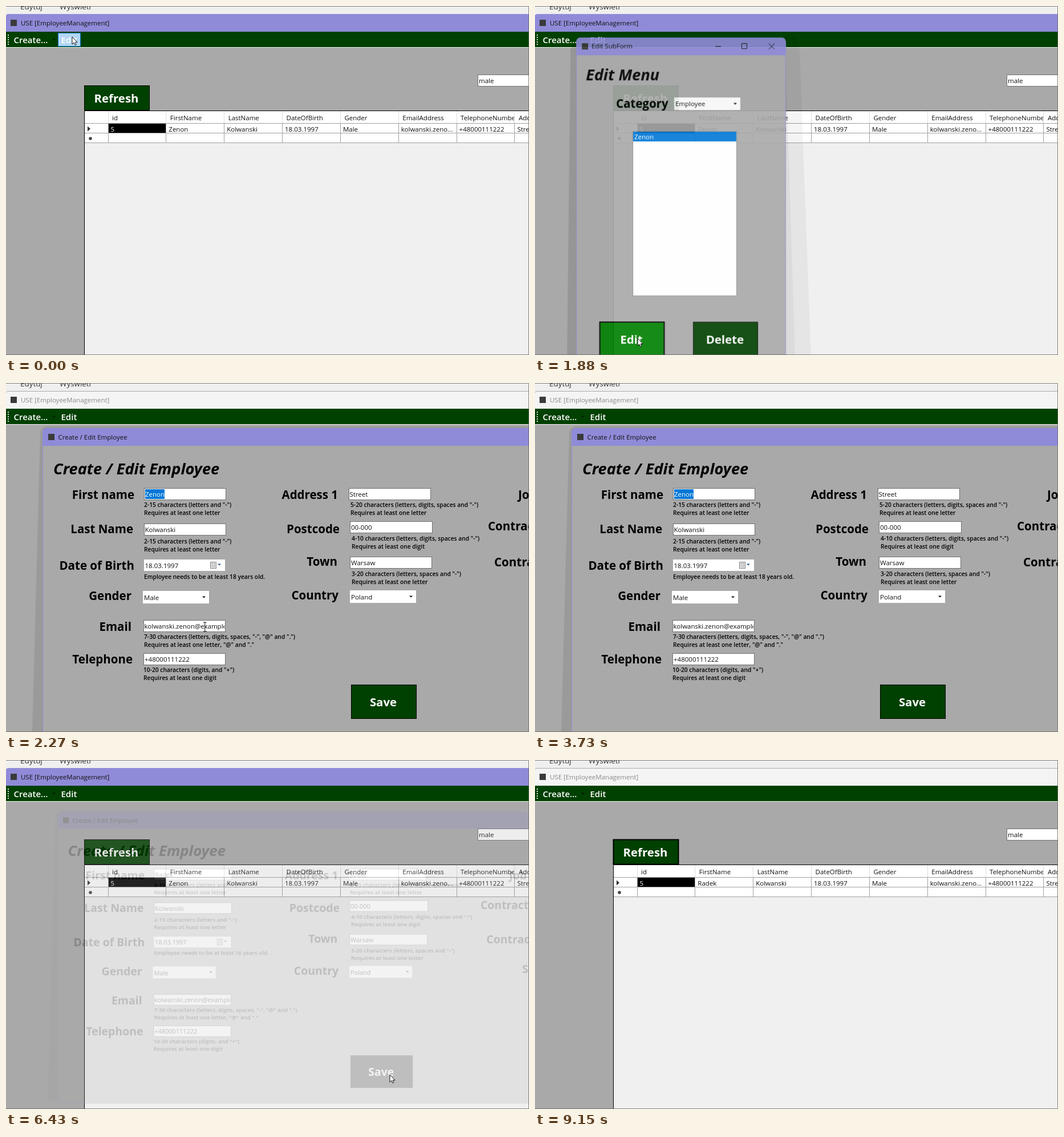
An HTML page for the animation above (9190 ms loop, 917 px wide and 611 px high).

```html
<!DOCTYPE html>
<html>
<head>
<meta charset="utf-8">
<style>
  html, body { margin: 0; width: 100%; height: 100%; overflow: hidden; background: #a9a9a9; }
  svg { display: block; width: 100vw; height: 100vh; }
  text { font: 11.5px "Open Sans", "Noto Sans", sans-serif; fill: #111; white-space: pre; }
  .label { font-size: 20.5px; font-weight: 700; fill: #000; }
  .end { text-anchor: end; }
  .head { font-size: 27.2px; font-weight: 700; font-style: italic; fill: #000; }
  .hint { font-size: 10.25px; font-weight: 600; fill: #000; }
  .btn { font-size: 20.4px; font-weight: 700; fill: #fff; text-anchor: middle; }
  .menu { font-size: 15px; font-weight: 600; fill: #fff; }
  .top { font-size: 13.4px; fill: #333; }
  .white { fill: #fff; }
</style>
</head>
<body>
<svg id="stage" viewBox="0 0 917 611"></svg>
<script>
const LOOP = 9190;
const OLD = 'Zenon', NEW = 'Radek', LAST = 'Kolwanski', PHONE = '+48000111222', BORN = '18.03.1997';
const PURPLE = '#8f8bd8', DARK = '#004000', HOVER = '#008000', PRESS = '#000', BLUE = '#0078d7';

const text = (s, x, y, cls = '', extra = '') => `<text x="${x}" y="${y}" class="${cls}" ${extra}>${s}</text>`;
const rect = (x, y, w, h, fill, extra = '') =>
  `<rect x="${x}" y="${y}" width="${w}" height="${h}" fill="${fill}" ${extra}/>`;
const path = (d, fill, extra = '') => `<path d="${d}" fill="${fill}" ${extra}/>`;
const group = (id, ...parts) => `<g id="${id}">${parts.join('')}</g>`;
const box = (x, y, w, h) => rect(x + .5, y + .5, w, h - 1, '#fff', 'stroke="#707070"');
const arrow = (x, y, fill = '#111') => path(`M${x - 3},${y - 1.5}h6l-3,3z`, fill);
const combo = (x, y) => rect(x, y, 116, 22, '#fff') + arrow(x + 107, y + 11);
const icon = (x, y) => rect(x, y, 11, 11, '#3a3a3a');
const button = (id, s, x, y, w, h) =>
  rect(x + .5, y + .5, w - 1, h - 1, DARK, `id="${id}" stroke="#000"`) + text(s, x + w / 2 - 1, y + h / 2 + 8, 'btn');
const frame = (x, y, w, h) =>
  rect(x + .5, y + .5, w - 1, h, '#a9a9a9', `rx="8" stroke="${PURPLE}"`) +
  path(`M${x},${y + 31}v-23q0,-8 8,-8h${w - 16}q8,0 8,8v23z`, PURPLE);

function grid() {
  const cols = [
    ['id', '5'], ['FirstName', OLD], ['LastName', LAST], ['DateOfBirth', BORN], ['Gender', 'Male'],
    ['EmailAddress', 'kolwanski.zeno...'], ['TelephoneNumber', PHONE], ['Address', 'Street']
  ];
  let s = rect(137, 183, 780, 428, '#f0f0f0') + rect(138, 184, 779, 56, '#fff');
  cols.forEach(([head, cell], i) => {
    const x = 179.5 + i * 101.85, left = Math.round(x);
    s += rect(left, 184, 103, 55, '#fff') + (i ? '' : rect(left, 206, 101, 16, '#000'));
    s += text(head, x + 6.5, 199.5) + text(cell, x + 4, 219.5, i ? '' : 'white', i === 1 ? 'id="cell"' : '');
    s += path(`M${left - .5},206v33`, 'none', 'stroke="#a0a0a0"') + path(`M${left - .5},184v22`, 'none', 'stroke="#ddd"');
  });
  return s + path('M138,205.5h779M138,222.5h779M138,239.5h779', 'none', 'stroke="#a0a0a0"') +
    path('M137.5,611V183.5H917', 'none', 'stroke="#000"') +
    path('M143,210.5l5,4.5l-5,4.5z', '#333') + '<circle cx="148" cy="232" r="2.8" fill="#444"/>';
}

function mainWindow() {
  return rect(0, 0, 917, 16, '#efefef') + text('Edytuj', 25, 6, 'top') + text('Wyświetl', 94, 6, 'top') +
    path('M-1,46V20.5q0,-6 6,-6H918V46z', PURPLE, 'id="bar"') + icon(8, 24) +
    text('USE [EmployeeManagement]', 26, 34, '', 'id="caption"') +
    rect(0, 45, 917, 27, DARK) + rect(0, 72, 917, 1, '#f4f4f4') +
    path('M4,50V69', 'none', 'stroke="#ddd" stroke-width="2" stroke-dasharray="2 2"') +
    arrow(84, 59, '#001800') +
    rect(91.5, 47.5, 39, 23, '#b3d7f3', `id="menuHot" stroke="${BLUE}"`) +
    text('Create...', 13.5, 65, 'menu') + text('Edit', 96.5, 65, 'menu') +
    box(827, 120, 120, 21) + text('male', 829, 134.5) +
    button('refresh', 'Refresh', 137, 139, 115, 44) + grid();
}

function pickWindow() {
  return path('M62,75L56,611H72V62z', '#000', 'opacity=".12"') +
    path('M436,48Q460,46 464,72L484,611H439V60z', '#000', 'opacity=".05"') +
    path('M439,60L456,611H439z', '#000', 'opacity=".05"') +
    frame(72, 55, 368, 600) + icon(82, 65) + text('Edit SubForm', 99, 74.5) +
    path('M316,70.5h10M362.5,65.5h9v9h-9zM410,65.5l10,10M420,65.5l-10,10', 'none', 'stroke="#111"') +
    text('Edit Menu', 89, 130, 'head') + text('Category', 142, 178, 'label') +
    combo(244, 160) + text('Employee', 246, 175) +
    rect(171.5, 219.5, 182, 288, '#fff', 'stroke="#8a8a8a"') + rect(172, 220, 181, 17, BLUE, 'id="row"') +
    text(OLD, 174, 233, '', 'id="rowText"') +
    button('edit', 'Edit', 113, 553, 114, 61) + button('del', 'Delete', 277, 553, 114, 61);
}

function formWindow() {
  const late = [
    ['First name', 119, 225, 203], ['Last Name', 117, 223, 263], ['Date of Birth', 93, 225, 327],
    ['Gender', 146, 220, 380], ['Email', 165, 220, 434], ['Telephone', 118, 222, 491],
    ['Contract Type', 845, 990, 258], ['Contract Start', 856, 1002, 321], ['Salary', 922, 990, 376]
  ];
  const right = [['Address 1', 582, 203], ['Postcode', 585, 263], ['Town', 581, 320], ['Country', 583, 379]];
  const letter = 'Requires at least one letter', digit = 'Requires at least one digit';
  const hints = [
    [242, 217, '2-15 characters (letters and "-")', letter],
    [242, 281, '2-15 characters (letters and "-")', letter],
    [242, 343, 'Employee needs to be at least 18 years old.', ''],
    [242, 448, '7-30 characters (letters, digits, spaces, "-", "@" and ".")', letter + ', "@" and "."'],
    [241, 506, '10-20 characters (digits, and "+")', digit],
    [604, 217, '5-20 characters (letters, digits, spaces and "-")', letter],
    [606, 276, '4-10 characters (letters, digits, spaces and "-")', digit],
    [606, 338, '3-20 characters (letters, spaces and "-")', letter]
  ];
  return path('M60,88Q60,77 72,76H917V90H64V611H46z', '#000', 'opacity=".09"') +
    frame(64, 79, 1052, 537) + icon(74, 89) + text('Create / Edit Employee', 91.5, 99) +
    box(242, 184, 143, 21) + box(242, 246, 143, 21) + rect(242, 309, 142, 20, '#fff') +
    combo(240, 364) + box(241, 415, 143, 21) + box(241, 473, 143, 21) +
    box(601, 184, 143, 21) + box(603, 242, 144, 21) + box(603, 304, 143, 21) + combo(603, 363) +
    rect(358.5, 313.5, 10, 11, '#e4e4e4', 'stroke="#888"') +
    path('M359,316.5h10M359,320.5h10M362,314v10M365.5,314v10', 'none', 'stroke="#aaa" stroke-width=".7"') +
    arrow(374, 318, '#2a5a8a') +
    text(BORN, 243.5, 324) + text('Street', 602.5, 199) + text('00-000', 605, 257) +
    text('Warsaw', 605, 319) + text('Poland', 605, 379) +
    text('', 244, 199, '', 'id="name"') + rect(277, 186, 1, 17, '#000', 'id="caret"') +
    '<clipPath id="clip"><rect id="sel" y="186" width="34" height="17"/></clipPath><g id="marked" clip-path="url(#clip)">' +
    rect(244, 186, 34, 17, BLUE) + text(OLD, 244, 199, 'white') + '</g>' +
    right.map(([s, x, y]) => text(s, x, y, 'label end')).join('') + text('Job Title', 898, 203, 'label') +
    hints.map(([x, y, a, b]) => text(a, x, y, 'hint') + text(b, x, y + 14, 'hint')).join('') +
    group('early', rect(76, 132, 309, 35, '#f0f0f0'), rect(605, 528, 115, 60, '#f0f0f0'),
      ...late.map(([, a, b, y]) => rect(a - 5, y - 24, b - a + 12, 29, '#f0f0f0'))) +
    group('late', text('Create / Edit Employee', 83, 160, 'head'),
      ...late.map(([s, a, b, y]) => a > 800 ? text(s, a, y, 'label') : text(s, b, y, 'label end')),
      text(LAST, 243.5, 261), text('Male', 242, 380),
      '<svg x="241" y="415" width="142" height="21">' + text('kolwanski.zenon@example.com', 1.5, 15) + '</svg>',
      text(PHONE, 243, 488), button('save', 'Save', 605, 528, 115, 60));
}

const stage = document.getElementById('stage');
stage.innerHTML = mainWindow() + group('pick', pickWindow()) + group('form', formWindow()) +
  path('M0,.5H916.5V610.5H0', 'none', 'stroke="#666" opacity=".8"') +
  group('pointer',
    path('M0,0V13L3,10.2L5,14.5L7,13.6L5.2,9.5H9z', '#fff', 'id="hand" stroke="#000" stroke-width=".9"') +
    path('M-3,-8H3M0,-8V8M-3,8H3', 'none', 'id="beam" stroke="#111"'));
const $ = id => document.getElementById(id);
const set = (id, attrs) => { for (const k in attrs) $(id).setAttribute(k, attrs[k]); };
const show = (id, on) => { $(id).style.display = on ? '' : 'none'; };

// pointer route: time, x, y
const route = [
  [0, 116, 54], [330, 116, 54], [900, 205, 229], [1080, 205, 229], [1620, 180, 582], [1880, 180, 582],
  [2070, 349, 428], [2250, 349, 428], [2790, 299, 193], [2860, 299, 193], [3180, 56, 171], [4979, 56, 171],
  [4980, 150, 187], [5690, 673, 551], [6730, 673, 551], [7350, 245, 120], [7620, 196, 153],
  [8130, 196, 153], [8920, 876, 556], [LOOP, 876, 556]
];
const typed = [3790, 3970, 4150, 4350, 4410];

function pointerAt(t) {
  const i = route.findIndex(p => p[0] > t), [t0, x0, y0] = route[i - 1], [t1, x1, y1] = route[i];
  const k = (t - t0) / (t1 - t0), e = k * k * (3 - 2 * k);
  return [x0 + (x1 - x0) * e, y0 + (y1 - y0) * e];
}

// window fades and zooms in from `open`, out from `close`
function animate(id, t, open, close, fade, cx, cy) {
  const a = Math.min(1, (t - open) / 200), b = Math.max(0, (t - close) / fade);
  show(id, a > 0 && b < 1);
  if (a <= 0 || b >= 1) return;
  const s = .87 + .13 * a ** 1.5 - .08 * b * b;
  set(id, { opacity: a * (1 - b), transform: `translate(${cx * (1 - s)} ${cy * (1 - s)}) scale(${s})` });
}

function draw(t) {
  const [x, y] = pointerAt(t);
  const over = (l, top, w, h) => x >= l && x < l + w && y >= top && y < top + h;

  const idle = (t >= 130 && t < 1860) || (t >= 2010 && t < 6240) || t >= 9150;
  set('bar', { fill: idle ? '#f4f4f4' : PURPLE, stroke: idle ? '#aaa' : PURPLE });
  $('caption').style.fill = idle ? '#8a8a8a' : '#111';
  show('menuHot', t < 150);
  const pressed = t >= 7740 && t < 7860;
  set('refresh', {
    fill: pressed ? PRESS : t > 6500 && over(137, 139, 115, 44) ? HOVER : DARK,
    'stroke-width': t >= 7740 ? 2 : 1
  });
  $('cell').textContent = t < 7860 ? OLD : NEW;

  animate('pick', t, 150, 1867, 150, 255, 340);
  const picked = t >= 960;
  show('row', picked);
  $('rowText').style.fill = picked ? '#fff' : '#111';
  set('edit', { fill: over(113, 553, 114, 61) ? HOVER : DARK, 'stroke-width': t > 1750 ? 2 : 1 });

  animate('form', t, 2006, 6240, 240, 587, 313);
  show('early', t < 2110);
  show('late', t >= 2110);
  const n = typed.filter(k => k <= t).length;
  $('name').textContent = n ? NEW.slice(0, n) : OLD;
  const left = t < 2820 ? 244 : Math.min(278, Math.max(244, x));
  show('marked', !n);
  set('sel', { x: left, width: 278 - left });
  show('caret', n && t < 6240 && Math.floor((t - typed[n - 1]) / 530) % 2 === 0);
  if (n) set('caret', { x: Math.round(244 + $('name').getComputedTextLength()) });
  set('save', { fill: t >= 6240 ? PRESS : over(605, 528, 115, 60) ? HOVER : DARK });

  show('pointer', !(t >= 3730 && t < 4980) && t < 8920);
  const beam = t >= 2010 && t < 3730;
  show('beam', beam);
  show('hand', !beam);
  set('pointer', { transform: `translate(${x} ${y})` });
}

const start = performance.now();
function tick() {
  draw((performance.now() - start) % LOOP);
  requestAnimationFrame(tick);
}
tick();
</script>
</body>
</html>
```
